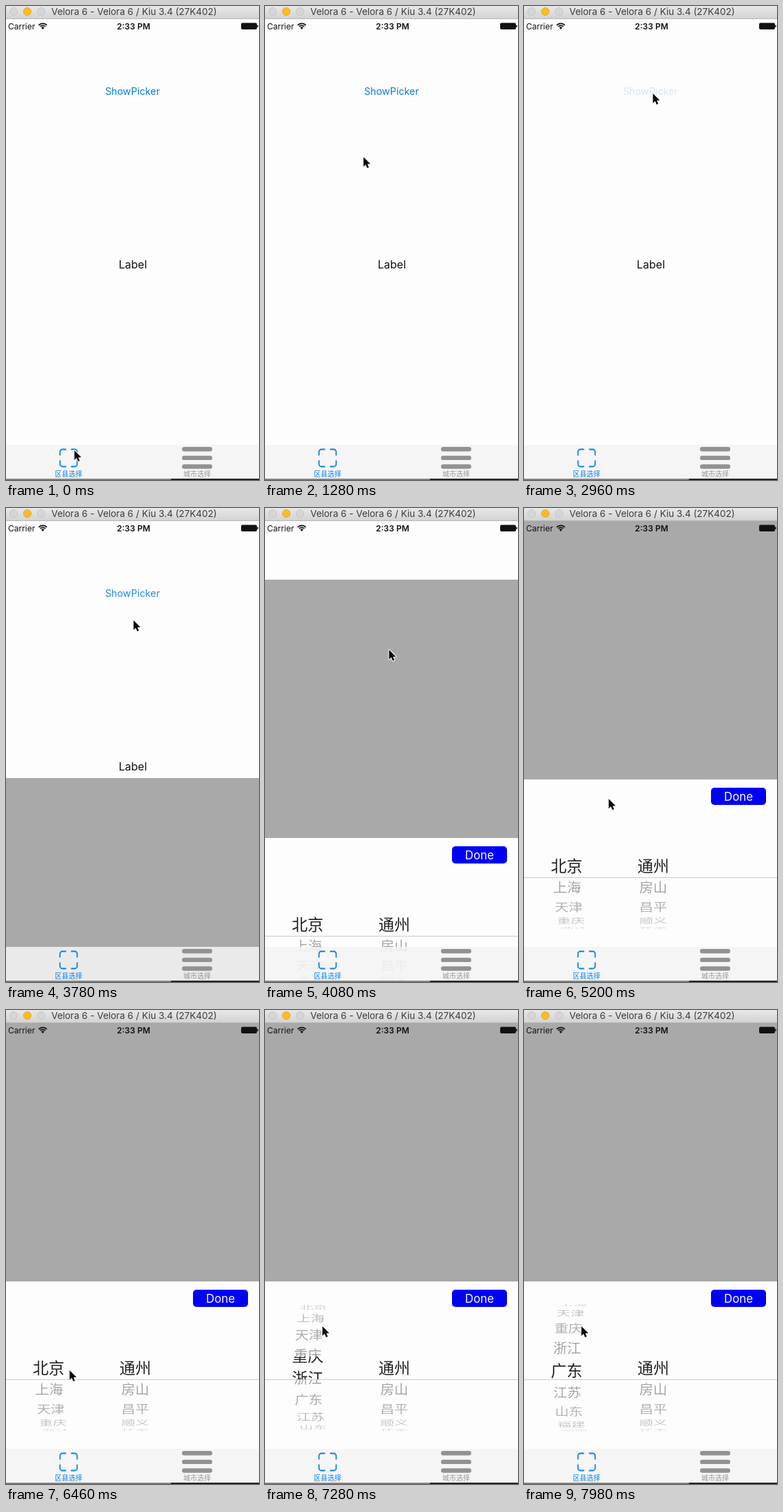
Animation, 368 px wide and 688 px high, one loop 8000 ms. Source, as an HTML page with a canvas:

```html
<!DOCTYPE html>
<html lang="en">
<head>
<meta charset="utf-8">
<title>Region picker</title>
<style>
  html, body { margin: 0; width: 100%; height: 100%; overflow: hidden; background: #fdfdfd; }
  canvas { display: block; width: 368px; height: 688px; }
</style>
</head>
<body>
<canvas id="stage" width="368" height="688"></canvas>
<script>
const ctx = document.getElementById('stage').getContext('2d');
const W = 368, LOOP = 8000;
const SANS = 'Inter, Roboto, sans-serif';
const CJK = '"Noto Sans CJK SC", "Noto Sans CJK", sans-serif';
const PAGE = '#fdfdfd', GRAY = '#a9a9a9', BLUE = '#087fe6', BAR = '#929292';

const cities = ['北京', '上海', '天津', '重庆', '浙江', '广东', '江苏', '山东', '福建', '湖南', '湖北'];
const districts = ['通州', '房山', '昌平', '顺义', '怀柔'];

// Pointer tip: [time, x, y]
const pointerPath = [
  [0, 99.5, 645], [150, 99.5, 645], [900, 130, 300], [1280, 139.5, 227], [1620, 187.5, 127],
  [3520, 187.5, 127], [3780, 185.5, 163], [4360, 176.5, 239], [5100, 130, 400],
  [5800, 92.5, 523], [6650, 92.5, 523], [7000, 83.5, 459], [8000, 83.5, 459]
];

const clamp = v => Math.min(1, Math.max(0, v));
const progress = (t, start, length) => clamp((t - start) / length);

// Even motion is shown in an uneven rhythm: three steps per 140 ms, held 20, 100 and 20 ms
function steppedTime(t) {
  const phase = t % 140;
  const step = phase < 20 ? 0 : phase < 120 ? 1 : 2;
  return t - phase + step * 140 / 3;
}

function text(str, x, y, size, color, { align = 'center', font = SANS, weight = 400 } = {}) {
  ctx.font = `${weight} ${size}px ${font}`;
  ctx.textAlign = align;
  ctx.textBaseline = 'alphabetic';
  ctx.fillStyle = color;
  ctx.fillText(str, x, y);
}

function rect(x, y, w, h, color, radius = 0) {
  ctx.fillStyle = color;
  ctx.beginPath();
  ctx.roundRect(x, y, w, h, radius);
  ctx.fill();
}

function clipped(x, y, w, h, draw) {
  ctx.save();
  ctx.beginPath();
  ctx.rect(x, y, w, h);
  ctx.clip();
  draw();
  ctx.restore();
}

function pointerAt(t) {
  const i = pointerPath.findIndex(p => p[0] > t);
  const [t0, x0, y0] = pointerPath[i - 1], [t1, x1, y1] = pointerPath[i];
  const k = (t - t0) / (t1 - t0);
  return [x0 + (x1 - x0) * k, y0 + (y1 - y0) * k];
}

// Distance of the sheet below its resting place: a critically damped spring
function sheetOffset(t) {
  const s = Math.max(0, t - 3546) * 0.0064;
  return Math.round(667 * (1 + s) * Math.exp(-s));
}

const cityScroll = t => 4.88 * (1 - (1 - progress(t, 6650, 1330)) ** 2);

function titleBar() {
  const shade = ctx.createLinearGradient(0, 0, 0, 18);
  shade.addColorStop(0, '#e8e8e8');
  shade.addColorStop(1, '#d3d3d3');
  rect(0, 0, W, 18, shade);
  rect(0, 18, W, 1, '#b6b6b6');
  [[11, '#d6d6d6', '#c0c0c0'], [31, '#fdbb20', '#dfa028'], [51, '#d6d6d6', '#c0c0c0']].forEach(([x, fill, edge]) => {
    ctx.beginPath();
    ctx.arc(x, 8, 5.6, 0, 7);
    ctx.fillStyle = fill;
    ctx.fill();
    ctx.strokeStyle = edge;
    ctx.lineWidth = 0.8;
    ctx.stroke();
  });
  text('Velora 6 - Velora 6 / Kiu 3.4 (27K402)', 66, 13, 13.5, '#3c3c3c', { align: 'left' });
}

function statusBar() {
  text('Carrier', 3, 34, 12, '#111', { align: 'left' });
  text('2:33 PM', 185.5, 34, 12, '#111', { weight: 600 });
  ctx.strokeStyle = '#111';
  ctx.lineWidth = 1.7;
  for (const r of [8.2, 5.2]) {
    ctx.beginPath();
    ctx.arc(53.5, 33.5, r, -Math.PI * 0.76, -Math.PI * 0.24);
    ctx.stroke();
  }
  ctx.fillStyle = '#111';
  ctx.beginPath();
  ctx.moveTo(53.5, 34);
  ctx.arc(53.5, 33.5, 3, -Math.PI * 0.76, -Math.PI * 0.24);
  ctx.fill();
  rect(342, 24.5, 23, 9.5, '#111', 2);
  rect(365.2, 27.5, 1.5, 3.6, '#111', 1);
}

function homeView(t) {
  const pressed = t > 2680 ? 1 - progress(t, 3480, 340) : 0;
  ctx.globalAlpha = 1 - 0.83 * pressed;
  text('ShowPicker', 184, 129, 14.3, '#0a7bdc');
  ctx.globalAlpha = 1;
  text('Label', 184.5, 381, 16, '#111');
}

// One wheel: rows sit on a cylinder; the middle band shows them magnified
function wheel(rows, x, skew, scroll) {
  const CENTER = 519, RADIUS = 92, STEP = 0.356;
  const drawRows = (size, color, fade) => rows.forEach((name, i) => {
    const angle = (i - scroll) * STEP;
    if (Math.abs(angle) > 1.5) return;
    const depth = Math.cos(angle);
    ctx.save();
    ctx.globalAlpha = fade ? 0.25 + 0.75 * depth : 1;
    ctx.translate(x + skew * (1 - depth), CENTER + RADIUS * Math.sin(angle));
    ctx.scale(1, depth);
    text(name, 0, size * 0.38, size, color, { font: CJK });
    ctx.restore();
  });
  const left = x - 50;
  clipped(left, 421, 110, 82, () => drawRows(20.3, '#a0a0a0', true));
  clipped(left, 536, 110, 79, () => drawRows(20.3, '#a0a0a0', true));
  clipped(left, 503, 110, 33, () => drawRows(23, '#222', false));
}

function sheet(t) {
  const offset = sheetOffset(t);
  clipped(0, 19, W, 669, () => {
    ctx.translate(0, offset);
    rect(0, 19, W, 375, GRAY);
    rect(0, 394, W, 294, PAGE);
    rect(272, 406, 80, 25, '#0000f5', 5);
    text('Done', 312, 425, 16.8, '#fdfdfd');
    wheel(cities, 62, 12, cityScroll(t));
    wheel(districts, 188, 0, 0);
    rect(0, 536, W, 1, '#cacaca');
  });
}

function tabBar() {
  rect(0, 637, W, 49, 'rgba(244, 244, 244, 0.87)');
  ctx.strokeStyle = BLUE;
  ctx.lineWidth = 1.8;
  for (const sx of [-1, 1]) for (const sy of [-1, 1]) {
    ctx.beginPath();
    ctx.moveTo(91 + sx * 3.5, 656 + sy * 12.5);
    ctx.arcTo(91 + sx * 12.5, 656 + sy * 12.5, 91 + sx * 12.5, 656 + sy * 3.5, 3.5);
    ctx.lineTo(91 + sx * 12.5, 656 + sy * 3.5);
    ctx.stroke();
  }
  for (const y of [640, 652.7, 665.3]) rect(256, y, 44, 6.4, BAR, 3.2);
  text('区县选择', 91, 682.5, 10, BLUE, { font: CJK });
  text('城市选择', 278, 682.5, 10, '#959595', { font: CJK });
  rect(0, 686, 240, 2, '#858585');
  rect(240, 686, 128, 2, '#252525');
}

function pointer(t) {
  const [x, y] = pointerAt(t);
  ctx.save();
  ctx.translate(x, y);
  ctx.beginPath();
  [[0, 0], [0, 14], [3.2, 11], [5.4, 16], [7.8, 15], [5.7, 10.2], [10, 10]].forEach(p => ctx.lineTo(...p));
  ctx.closePath();
  ctx.lineJoin = 'round';
  ctx.strokeStyle = '#fdfdfd';
  ctx.lineWidth = 2;
  ctx.stroke();
  ctx.fillStyle = '#080808';
  ctx.fill();
  ctx.restore();
}

function frame(now) {
  const t = steppedTime(now % LOOP);
  rect(0, 0, W, 688, PAGE);
  homeView(t);
  sheet(t);
  titleBar();
  statusBar();
  tabBar();
  pointer(t);
  requestAnimationFrame(frame);
}
requestAnimationFrame(frame);
</script>
</body>
</html>
```
